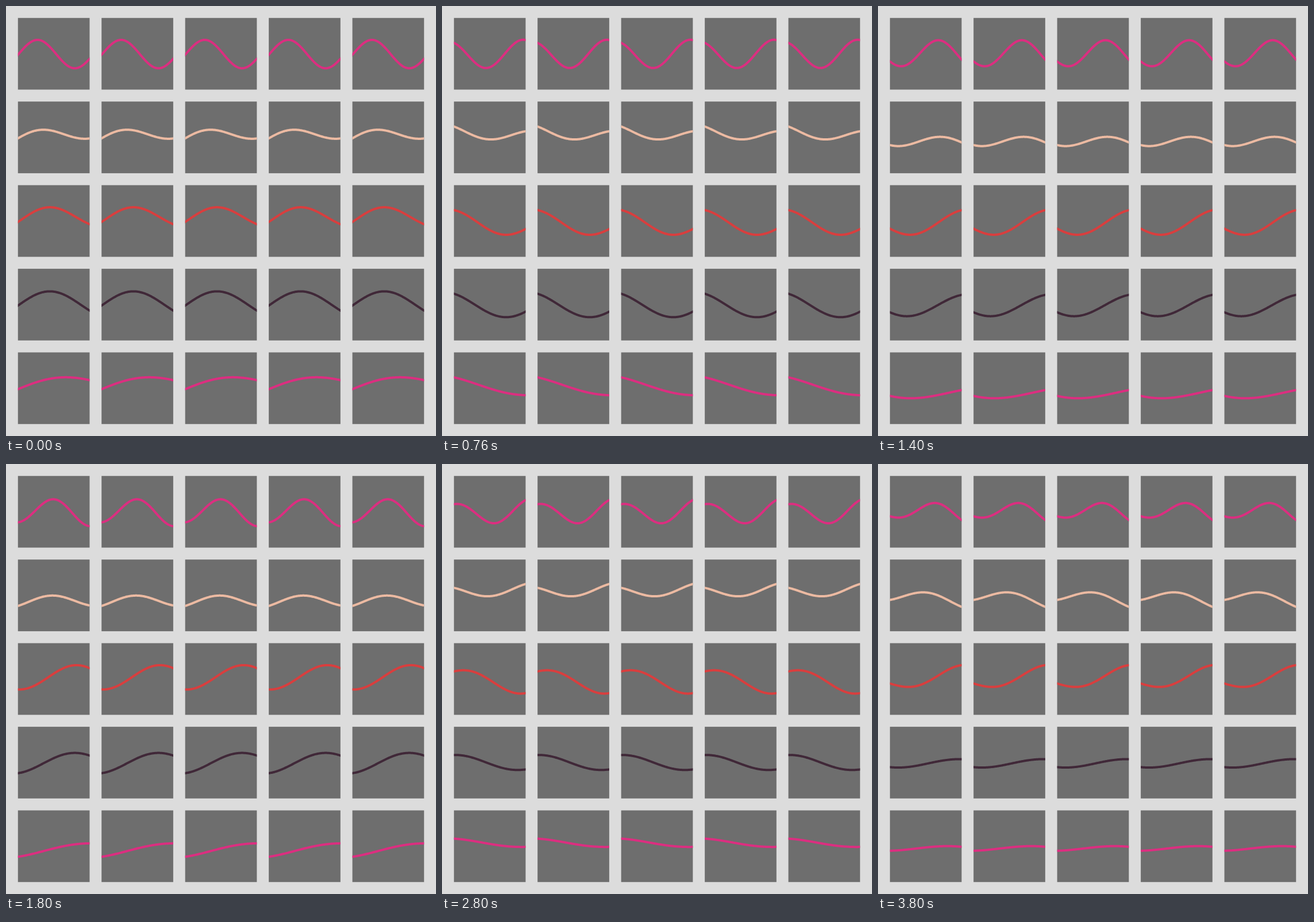
Write an HTML page with a canvas that moves like this. It is 748x748 px and loops after 3840 ms.

```html
<!DOCTYPE html>
<html>
<head>
<meta charset="utf-8">
<style>
  html, body { margin: 0; overflow: hidden; background: #dcdcdc; }
  canvas { display: block; }
</style>
</head>
<body>
<canvas width="748" height="748"></canvas>
<script>
const ctx = document.querySelector('canvas').getContext('2d');
const LOOP = 3840, STEP = 40;
const TILE = 748 / 6, GAP = TILE / 6, AMP = TILE / 10;

// Each row adds two travelling sines with wave numbers k1 and k2.
const rows = [
  { color: '#dc2e80', k1: 0.0435, k2: 0.0525 },
  { color: '#ecbaa2', k1: 0.0369, k2: 0.0115 },
  { color: '#d93e3e', k1: 0.0191, k2: 0.0369 },
  { color: '#402838', k1: 0.0297, k2: 0.0285 },
  { color: '#dc2e80', k1: 0.0215, k2: 0.0131 }
];

function drawTile(left, top, { color, k1, k2 }, t) {
  ctx.save();
  ctx.translate(left, top);
  ctx.fillStyle = '#6e6e6e';
  ctx.fillRect(0, 0, TILE, TILE);
  ctx.beginPath();
  ctx.rect(0, 0, TILE, TILE);
  ctx.clip();
  ctx.beginPath();
  for (let x = -2; x <= TILE + 2; x++) {
    const wave = Math.sin(0.25 + 3.025 * t + k1 * x) + Math.sin(-0.35 + 2.535 * t + k2 * x);
    ctx.lineTo(x, TILE / 2 + 0.5 - AMP * wave);
  }
  ctx.strokeStyle = color;
  ctx.lineWidth = 4;
  ctx.stroke();
  ctx.restore();
}

function draw(now) {
  const t = Math.floor((now % LOOP) / STEP) * STEP / 1000;
  ctx.fillStyle = '#dcdcdc';
  ctx.fillRect(0, 0, 748, 748);
  rows.forEach((row, r) => {
    for (let c = 0; c < 5; c++) {
      drawTile(GAP + c * (TILE + GAP), GAP + r * (TILE + GAP), row, t);
    }
  });
}

let start;
function tick(now) {
  start ??= now;
  draw(now - start);
  requestAnimationFrame(tick);
}
draw(0);
requestAnimationFrame(tick);
</script>
</body>
</html>
```
